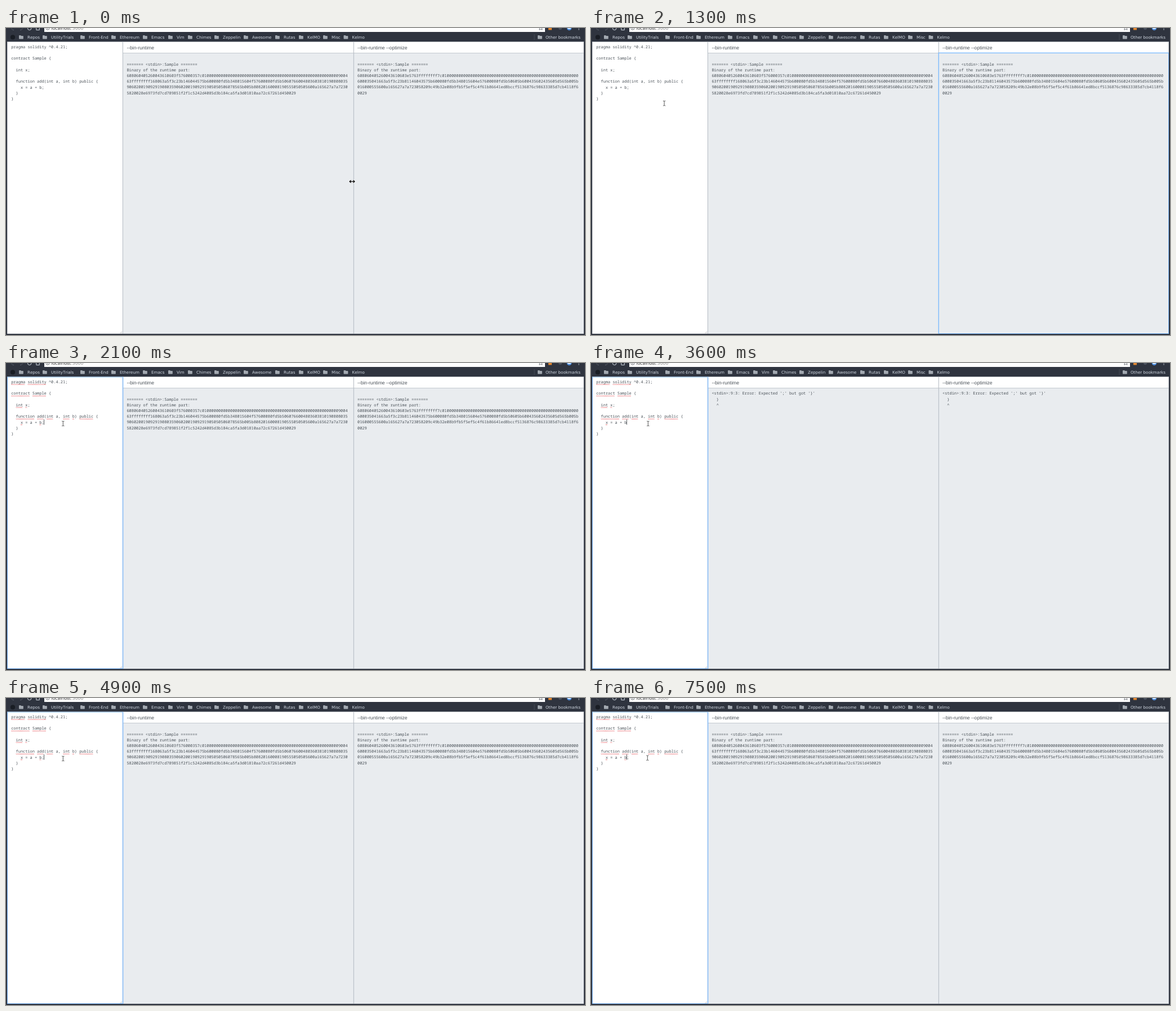
Animation of 1028x545 px, one loop 8 s. Source, as an HTML page with a canvas:

```html
<!DOCTYPE html>
<html lang="en">
<head>
<meta charset="utf-8">
<title>Compiler panes</title>
<style>
html, body { margin: 0; width: 100%; height: 100%; overflow: hidden; background: #2f343f; }
canvas { display: block; width: 1028px; height: 545px; }
</style>
</head>
<body>
<canvas id="stage"></canvas>
<script>
const W = 1028, H = 545, LOOP = 8000;
const canvas = document.getElementById('stage');
const ratio = window.devicePixelRatio || 1;
canvas.width = Math.round(W * ratio);
canvas.height = Math.round(H * ratio);
const ctx = canvas.getContext('2d');

const MONO = '6.96px "Noto Sans Mono", monospace';
const LABEL = '8.57px "Liberation Sans", Arial, sans-serif';
const MENU = '7.14px "DejaVu Sans", sans-serif';
const CHAR = 4.176, PITCH = 10.22;
const DARK = '#2f343f', INK = '#495057', PANEL = '#e9ecef';
const EDGE = '#c3c9cf', LIGHT = '#d3dae3', FOLDER = '#a3a9b1';
const CODE_X = 9.2, CODE_Y = 36;
const PAGE = { left: 2, top: 24.5, right: 1026, bottom: 543 };

const bookmarks = [
  ['Repos', 38], ['UtilityTrials', 80], ['Front-End', 147], ['Ethereum', 202],
  ['Emacs', 258], ['Vim', 303], ['Chimes', 338], ['Zeppelin', 385],
  ['Awesome', 437], ['Rutas', 493], ['KelMO', 535], ['Misc', 578], ['Kelmo', 614.5]
];

const code = [
  'pragma solidity ^0.4.21;', '', 'contract Sample {', '', '  int x;', '',
  '  function add(int a, int b) public {', '    x = a + b;', '  }', '}'
];

const zeros = '0'.repeat(56);
const heading = ['', '======= <stdin>:Sample =======', 'Binary of the runtime part:'];
const plain = [...heading,
  '608060405260043610603f576000357c01' + zeros + '9004',
  '63ffffffff168063a5f3c23b146044575b600080fd5b348015604f57600080fd5b5060766004803603810190808035',
  '9060200190929190803590602001909291905050506078565b005b80820160008190555050505600a165627a7a7230',
  '5820028e6973fd7cd789851f2f1c5242d4085d3b184ca5fa3d01810aa72c67261d450029'
];
const optimized = [...heading,
  '608060405260043610603e5763ffffffff7c01' + zeros,
  '600035041663a5f3c23b81146043575b600080fd5b348015604e57600080fd5b50605b600435602435605d565b005b',
  '016000555600a165627a7a723058209c49b32e08b9fb5f5ef5c4f61b86641ed8bccf5136876c98633385d7cb4118f6',
  '0029'
];
const failure = ["<stdin>:9:3: Error: Expected ';' but got '}'", '  }', '  ^'];

// Pointer path: time, x, y
const path = [
  [500, 614.5, 272.5], [600, 545, 270], [700, 414.3, 265.5], [900, 255, 222],
  [1100, 172, 170], [1400, 116.5, 122], [1700, 101.3, 107.5]
];

function rect(x, y, w, h, color) {
  ctx.fillStyle = color;
  ctx.fillRect(x, y, w, h);
}

function disc(x, y, r, color) {
  ctx.fillStyle = color;
  ctx.beginPath();
  ctx.arc(x, y, r, 0, Math.PI * 2);
  ctx.fill();
}

function line(points, color, width = 1) {
  ctx.strokeStyle = color;
  ctx.lineWidth = width;
  ctx.beginPath();
  points.forEach(([x, y], i) => i ? ctx.lineTo(x, y) : ctx.moveTo(x, y));
  ctx.stroke();
}

function text(str, x, y, font, color) {
  ctx.font = font;
  ctx.fillStyle = color;
  ctx.fillText(str, x, y);
}

function block(lines, x, y) {
  lines.forEach((s, i) => text(s, x, y + i * PITCH, MONO, INK));
}

function folder(x) {
  ctx.fillStyle = FOLDER;
  ctx.beginPath();
  ctx.roundRect(x, 13, 3.8, 3, 0.7);
  ctx.roundRect(x, 13.9, 7.8, 5.5, 0.7);
  ctx.fill();
}

function drawBrowser() {
  rect(0, 0, W, H, DARK);
  rect(68, 0, 889, 7, '#fff');
  line([[9.5, 1], [12, 3.5], [14, 3.5]], '#5b626d');
  line([[29.5, 1], [27, 3.5], [25, 3.5]], '#5b626d');
  ctx.strokeStyle = LIGHT;
  ctx.lineWidth = 1;
  ctx.beginPath();
  ctx.arc(41.7, 0.3, 3.3, 0, Math.PI);
  ctx.stroke();
  line([[53.8, 0], [53.8, 3.6], [59.3, 3.6], [59.3, 0]], LIGHT);
  ctx.strokeStyle = '#5a5f66';
  ctx.lineWidth = 0.8;
  ctx.beginPath();
  ctx.arc(74, 0, 3.3, 0, Math.PI * 2);
  ctx.stroke();
  rect(73.6, 0, 0.9, 2, '#5a5f66');
  const urlFont = '7.73px "DejaVu Sans", sans-serif';
  text('localhost', 80.5, 2.8, urlFont, '#2b2b2b');
  const hostWidth = ctx.measureText('localhost').width;
  text(':3000', 80.5 + hostWidth, 2.8, urlFont, '#8a8a8a');
  line([[947.5, 0], [946.8, 3.5], [949.4, 2], [952, 3.5], [951.3, 0]], '#5a5f66', 0.8);
  rect(963, 0, 6, 3.5, '#e2862f');
  disc(984, 0.3, 3, '#4a515d');
  disc(1000, 0, 4.3, '#4d8fe0');
  rect(997.5, 0, 5, 1.5, '#fff');
  disc(1017, 0, 0.8, LIGHT);
  disc(1017, 2.8, 0.8, LIGHT);

  disc(12, 16.4, 4.1, '#191d24');
  for (const [name, x] of bookmarks) {
    folder(x - 15);
    text(name, x, 18.9, MENU, LIGHT);
  }
  rect(937.6, 11, 0.8, 10, '#4b525e');
  folder(944);
  text('Other bookmarks', 958, 18.9, MENU, LIGHT);
}

function drawPanes() {
  const { left, top, right, bottom } = PAGE;
  const width = right - left, height = bottom - top;
  rect(left, top, width, height, '#fff');
  rect(207.5, 44.5, right - 207.5, bottom - 44.5, PANEL);
  rect(207, 44, right - 207, 1, EDGE);
  rect(left, top, width, 0.5, EDGE);
  rect(left, bottom - 0.6, width, 0.6, EDGE);
  rect(left, top, 0.6, height, EDGE);
  rect(right - 0.6, top, 0.6, height, EDGE);
  rect(206.8, top, 1.1, height, '#b7bec5');
  rect(616.8, top, 1.1, height, '#b7bec5');
  line([[202.5, 542], [205.8, 538.7]], '#999', 0.6);
  line([[204.4, 542], [205.8, 540.6]], '#999', 0.6);
  text('--bin-runtime', 214.4, 37.7, LABEL, INK);
  text('--bin-runtime --optimize', 624, 37.7, LABEL, INK);
}

// Blue border with a faint glow, cut off at the page edge
function focusRing(x, y, right, bottom, alpha) {
  if (alpha <= 0) return;
  const { left, top } = PAGE;
  ctx.save();
  ctx.beginPath();
  ctx.rect(left, top, PAGE.right - left, PAGE.bottom - top);
  ctx.clip();
  ctx.strokeStyle = '#80bdff';
  for (const [grow, strength] of [[0.5, 0.4], [-0.5, 1]]) {
    ctx.globalAlpha = alpha * strength;
    ctx.lineWidth = 1;
    ctx.strokeRect(x - grow, y - grow, right - x + 2 * grow, bottom - y + 2 * grow);
  }
  ctx.restore();
}

function squiggle(row, col, length) {
  const y = CODE_Y + row * PITCH + 2.1;
  const start = CODE_X + col * CHAR, end = start + length * CHAR;
  const points = [];
  for (let x = start, i = 0; x <= end; x += 1.05, i++) points.push([x, y + (i % 2 ? 0.45 : -0.45)]);
  line(points, '#e4555a', 0.75);
}

function drawSpelling(broken) {
  code.forEach((s, row) => {
    for (const m of s.matchAll(/[a-z]+/gi)) {
      if (m[0] === 'a' || (broken && row === 7 && m[0] === 'b')) continue;
      squiggle(row, m.index, m[0].length);
    }
  });
}

function drawCaret(t, broken) {
  const on = (t >= 1900 && t < 3900) || (t >= 4600 && t < 5600) ||
    (t >= 6200 && t < 6800) || t >= 7500;
  if (!on) return;
  rect(broken || t >= 7500 ? 63.2 : 67.2, 100.2, 0.8, 9.4, '#33383d');
}

function pointerAt(t) {
  const step = Math.floor(t / 100) * 100;
  if (step >= 6200) return [100.3, 106.3];
  if (step <= path[0][0]) return path[0].slice(1);
  const i = path.findIndex(p => p[0] >= step);
  if (i < 0) return path[path.length - 1].slice(1);
  const [t0, x0, y0] = path[i - 1], [t1, x1, y1] = path[i];
  const k = (step - t0) / (t1 - t0), e = t1 - t0 > 100 ? k * (1.4 - 0.4 * k) : k;
  return [x0 + (x1 - x0) * e, y0 + (y1 - y0) * e];
}

function drawResize(x, y) {
  const strokes = [
    [[x - 4, y], [x + 4, y]],
    [[x - 2, y - 2.3], [x - 4.4, y], [x - 2, y + 2.3]],
    [[x + 2, y - 2.3], [x + 4.4, y], [x + 2, y + 2.3]]
  ];
  strokes.forEach(s => line(s, '#fff', 2.6));
  strokes.forEach(s => line(s, '#111', 1.4));
}

function drawBeam(x, y) {
  const serif = side => [
    [x - 2.1, y + side * 4.3], [x - 0.6, y + side * 4.1], [x, y + side * 3.5],
    [x + 0.6, y + side * 4.1], [x + 2.1, y + side * 4.3]
  ];
  const strokes = [[[x, y - 4], [x, y + 4]], serif(-1), serif(1)];
  strokes.forEach(s => line(s, 'rgba(255,255,255,.5)', 1.8));
  strokes.forEach(s => line(s, '#444', 0.9));
}

function draw(t) {
  ctx.setTransform(ratio, 0, 0, ratio, 0, 0);
  ctx.textRendering = 'geometricPrecision';
  ctx.fontKerning = 'none';
  drawBrowser();
  drawPanes();

  const broken = t >= 3600 && t < 4900;
  const left = t < 2000 ? 0 : t < 2100 ? 0.6 : 1;
  focusRing(617, 44, PAGE.right, PAGE.bottom, t < 100 ? 0 : 1 - left);
  focusRing(PAGE.left, PAGE.top, 207.8, PAGE.bottom, left);

  block(broken ? code.map((s, i) => i === 7 ? s.slice(0, -1) : s) : code, CODE_X, CODE_Y);
  if (t >= 2100) drawSpelling(broken);
  block(broken ? failure : plain, 214.4, 56.3);
  block(broken ? failure : optimized, 624, 56.3);
  drawCaret(t, broken);
  const [x, y] = pointerAt(t);
  (t < 600 ? drawResize : drawBeam)(x, y);
}

const origin = performance.now();
function tick() {
  draw((performance.now() - origin) % LOOP);
  requestAnimationFrame(tick);
}
tick();
</script>
</body>
</html>
```
